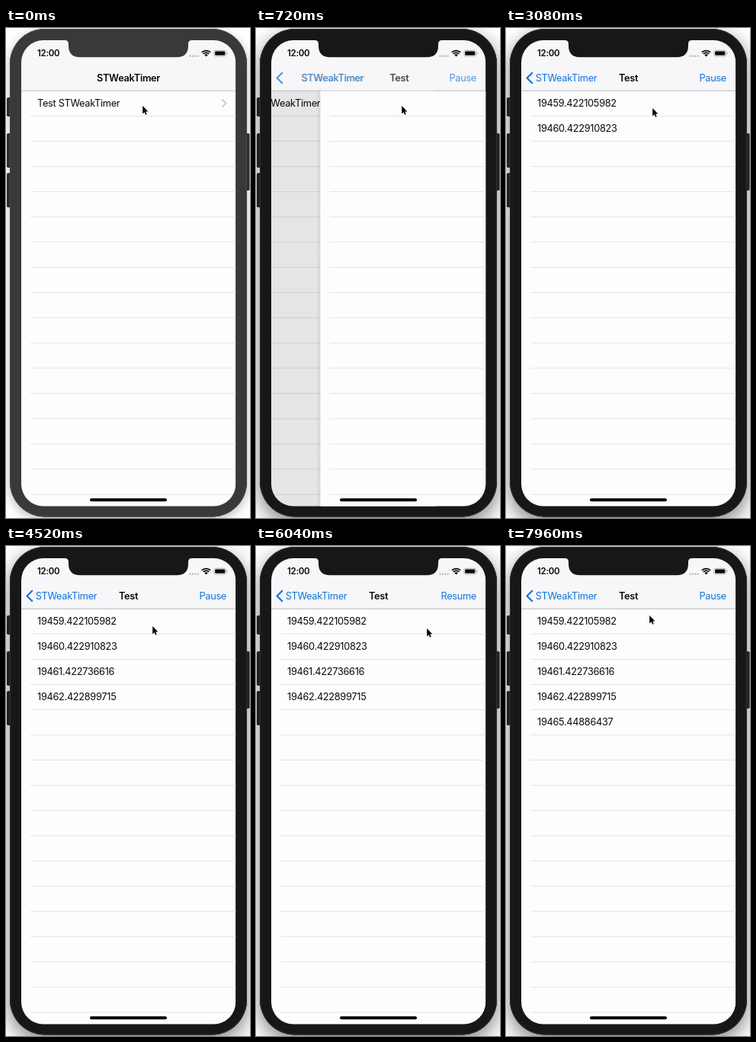
These frames come from a looping animation (320x642 px, 8 s). An HTML page with a canvas:

```html
<!DOCTYPE html>
<html lang="en">
<head>
<meta charset="utf-8">
<title>Timer demo</title>
<style>
  html, body { margin: 0; width: 100%; height: 100%; overflow: hidden; background: #fff; }
  canvas { display: block; width: 320px; height: 642px; }
</style>
</head>
<body>
<canvas id="stage"></canvas>
<script>
const W = 320, H = 642, LOOP = 8000, STEP = 40;
const canvas = document.getElementById('stage');
const ctx = canvas.getContext('2d');
const dpr = window.devicePixelRatio || 1;
canvas.width = W * dpr;
canvas.height = H * dpr;

const BLUE = '#1274dc', INK = '#0a0a0b', PAPER = '#fdfcfe', BAR = '#f7f6f8';
const SCREEN = { x: 20, y: 16, w: 281.3, h: 610.5, r: 29 };
const RIGHT = SCREEN.x + SCREEN.w;
const TABLE_TOP = 82.3, ROW = 33.05, ROWS = 16;

const ACTIVE_AT = 400, PUSH_AT = 566;
const PAUSE_DOWN = 4960, PAUSE_UP = 5040;
const RESUME_DOWN = 7440, RESUME_UP = 7560;

const ticks = [
  [1520, '19459.422105982'],
  [2520, '19460.422910823'],
  [3520, '19461.422736616'],
  [4520, '19462.422899715'],
  [RESUME_UP, '19465.44886437']
];

// Pointer moves: start, end, target x, target y
const moves = [
  [0, 120, 191, 102],
  [1240, 1320, 188, 102],
  [1480, 1800, 192, 105],
  [4520, 5000, 267, 66],
  [5320, 5680, 224, 108],
  [6760, 7320, 263.5, 64.3],
  [7600, 7960, 188, 91]
];

const clamp = v => Math.min(1, Math.max(0, v));
const mix = (a, b, p) => a + (b - a) * p;
const smooth = p => p * p * (3 - 2 * p);

// Critically damped spring, as used by navigation pushes
function spring(ms) {
  if (ms <= 0) return 0;
  if (ms > 530) return 1;
  const k = 18.26 * ms / 1000;
  return 1 - (1 + k) * Math.exp(-k);
}

function box(x, y, w, h, r, fill) {
  ctx.beginPath();
  ctx.roundRect(x, y, w, h, r);
  ctx.fillStyle = fill;
  ctx.fill();
}

function line(points, color, width) {
  ctx.beginPath();
  points.forEach(([x, y]) => ctx.lineTo(x, y));
  ctx.strokeStyle = color;
  ctx.lineWidth = width;
  ctx.stroke();
}

function text(str, x, y, { color = INK, weight = 400, size = 12.75, align = 'left', alpha = 1 } = {}) {
  if (alpha <= 0) return;
  ctx.save();
  ctx.globalAlpha *= alpha;
  ctx.font = `${weight} ${size}px Inter, Roboto, sans-serif`;
  ctx.letterSpacing = '-0.3px';
  ctx.textAlign = align;
  ctx.fillStyle = color;
  ctx.fillText(str, x, y);
  ctx.restore();
}

function drawBody(active) {
  const shell = active ? '#171718' : '#39393b';
  const button = active ? '#202022' : '#2c2c2e';
  ctx.save();
  ctx.shadowColor = active ? 'rgba(0,0,0,.5)' : 'rgba(0,0,0,.28)';
  ctx.shadowBlur = (active ? 26 : 14) * dpr;
  ctx.shadowOffsetY = (active ? 9 : 4) * dpr;
  box(5, 1, 311, 639.5, 46, shell);
  ctx.restore();
  [[1, 91, 25], [1, 138, 45], [1, 190, 45], [313.5, 138, 75]].forEach(([x, y, h]) =>
    box(x, y, 6, h, 1.8, button));
  box(5, 1, 311, 639.5, 46, shell);
  ctx.beginPath();
  ctx.roundRect(5.5, 1.5, 310, 638.5, 45.5);
  ctx.strokeStyle = active ? '#303032' : '#48484a';
  ctx.lineWidth = 1;
  ctx.stroke();
}

function drawNotch(active) {
  ctx.beginPath();
  ctx.moveTo(77, 15);
  ctx.lineTo(77, 16);
  ctx.quadraticCurveTo(82, 16, 82, 21);
  ctx.lineTo(82, 23);
  ctx.quadraticCurveTo(82, 38.3, 97, 38.3);
  ctx.lineTo(224, 38.3);
  ctx.quadraticCurveTo(239, 38.3, 239, 23);
  ctx.lineTo(239, 21);
  ctx.quadraticCurveTo(239, 16, 244, 16);
  ctx.lineTo(244, 15);
  ctx.fillStyle = active ? '#171718' : '#39393b';
  ctx.fill();
}

function drawStatus() {
  text('12:00', 41, 37.4, { weight: 600, size: 11.5 });
  for (let i = 0; i < 4; i++) box(240.3 + i * 3.4, 35.6, 2.4, 2.4, 1.2, '#bdbcbf');

  ctx.strokeStyle = INK;
  ctx.lineWidth = 1.7;
  [8, 5.3].forEach(r => {
    ctx.beginPath();
    ctx.arc(262.5, 37.6, r, -Math.PI * .75, -Math.PI * .25);
    ctx.stroke();
  });
  ctx.beginPath();
  ctx.moveTo(262.5, 37.6);
  ctx.arc(262.5, 37.6, 3.2, -Math.PI * .75, -Math.PI * .25);
  ctx.fillStyle = INK;
  ctx.fill();

  ctx.beginPath();
  ctx.roundRect(272.8, 29.3, 15.8, 7.8, 2.3);
  ctx.strokeStyle = '#a5a4a7';
  ctx.lineWidth = .8;
  ctx.stroke();
  box(274.1, 30.6, 13.2, 5.2, 1.2, INK);
  box(289.5, 31.8, 1, 2.8, .5, '#a5a4a7');
}

function drawTable(x, labels) {
  ctx.fillStyle = PAPER;
  ctx.fillRect(x, TABLE_TOP, SCREEN.w, H);
  ctx.fillStyle = '#e1e0e3';
  for (let i = 1; i <= ROWS; i++) {
    ctx.fillRect(x + 12, TABLE_TOP + i * ROW - .5, SCREEN.w, .9);
  }
  labels.forEach((label, i) => text(label, x + 21, TABLE_TOP + (i + .5) * ROW + 4.4));
}

function drawLists(t, p) {
  if (p < 1) {
    const x = SCREEN.x - .3 * SCREEN.w * p;
    drawTable(x, ['Test STWeakTimer']);
    line([[x + 263.5, 93.6], [x + 268.5, 98.6], [x + 263.5, 103.6]], '#c4c3c8', 1.5);
    ctx.fillStyle = `rgba(0,0,0,${.12 * p})`;
    ctx.fillRect(SCREEN.x, TABLE_TOP, SCREEN.w, H);
  }
  if (p > 0) {
    const x = mix(RIGHT, SCREEN.x, p);
    if (p < 1) {
      const shade = ctx.createLinearGradient(x - 6, 0, x, 0);
      shade.addColorStop(0, 'rgba(0,0,0,0)');
      shade.addColorStop(1, 'rgba(0,0,0,.07)');
      ctx.fillStyle = shade;
      ctx.fillRect(x - 6, TABLE_TOP, 6, H);
    }
    drawTable(x, ticks.filter(([at]) => t >= at).map(([, label]) => label));
  }
}

function pressAlpha(t, down, up) {
  if (t < down) return 1;
  if (t < up) return mix(1, .2, clamp((t - down + STEP) / 80));
  const rest = 1 - clamp((t - up) / 420);
  return 1 - .8 * rest * rest;
}

function drawNav(t, p) {
  ctx.fillStyle = BAR;
  ctx.fillRect(SCREEN.x, SCREEN.y, SCREEN.w, TABLE_TOP - SCREEN.y);
  ctx.fillStyle = '#cbcacd';
  ctx.fillRect(SCREEN.x, TABLE_TOP - .7, SCREEN.w, .8);

  const y = 70, mid = mix(160.6, 79, p);
  text('STWeakTimer', mid, y, { weight: 600, align: 'center', alpha: 1 - p });
  text('STWeakTimer', mid, y, { color: BLUE, align: 'center', alpha: p });
  text('Test', mix(264.6, 160.6, p), y, { weight: 600, align: 'center', alpha: p });

  ctx.save();
  ctx.globalAlpha = p;
  line([[34.8, 58.2], [27.6, 65.5], [34.8, 72.8]], BLUE, 2.2);
  ctx.restore();

  const paused = t >= PAUSE_UP && t < RESUME_UP;
  const press = pressAlpha(t, PAUSE_DOWN, PAUSE_UP) * pressAlpha(t, RESUME_DOWN, RESUME_UP);
  text(paused ? 'Resume' : 'Pause', 289, y, { color: BLUE, align: 'right', alpha: p * press });
}

function drawPointer(t) {
  let x = 179, y = 102;
  for (const [start, end, tx, ty] of moves) {
    const p = smooth(clamp((t - start) / (end - start)));
    x = mix(x, tx, p);
    y = mix(y, ty, p);
  }
  ctx.save();
  ctx.translate(x, y);
  ctx.beginPath();
  [[.2, 0], [.2, 10.4], [2.6, 8.2], [4.1, 11.7], [5.7, 11], [4.2, 7.6], [7.4, 7.4]]
    .forEach(([px, py]) => ctx.lineTo(px, py));
  ctx.closePath();
  ctx.lineJoin = 'round';
  ctx.strokeStyle = '#fff';
  ctx.lineWidth = 1.5;
  ctx.stroke();
  ctx.fillStyle = '#000';
  ctx.fill();
  ctx.restore();
}

function draw(t) {
  const active = t >= ACTIVE_AT;
  ctx.setTransform(dpr, 0, 0, dpr, 0, 0);
  ctx.fillStyle = '#fff';
  ctx.fillRect(0, 0, W, H);
  drawBody(active);

  ctx.save();
  ctx.beginPath();
  ctx.roundRect(SCREEN.x, SCREEN.y, SCREEN.w, SCREEN.h, SCREEN.r);
  ctx.clip();
  drawLists(t, spring(t - PUSH_AT));
  drawNav(t, spring(t - PUSH_AT - 10));
  drawStatus();
  box(110, 616.3, 101, 3.9, 2, '#000');
  ctx.restore();

  drawNotch(active);
  drawPointer(t);
}

const began = performance.now();
function frame() {
  const t = (performance.now() - began) % LOOP;
  draw(Math.floor(t / STEP) * STEP);
  requestAnimationFrame(frame);
}
frame();
</script>
</body>
</html>
```
